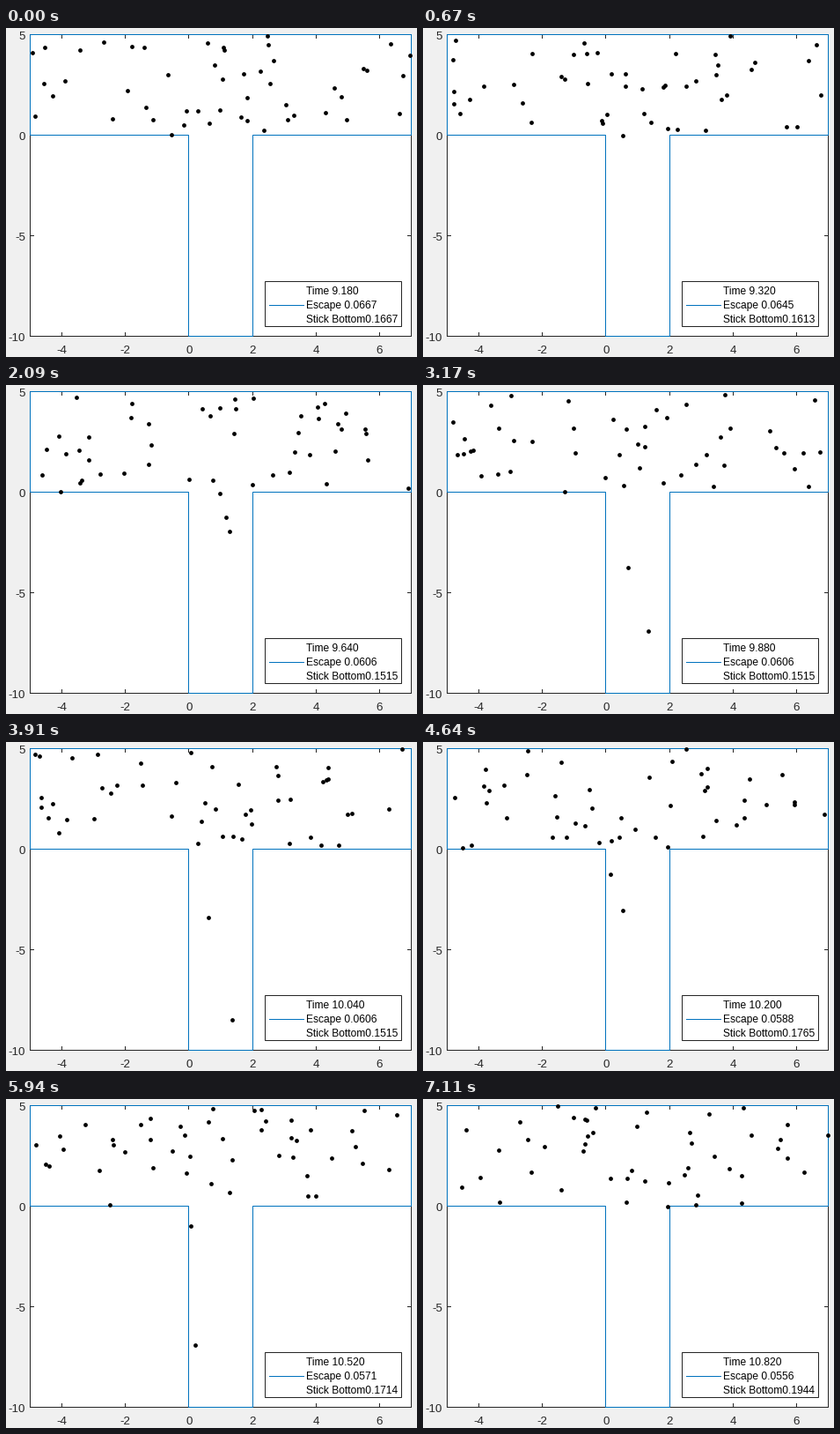
Animation of 467x373 px, one loop 7180 ms. Source, as a matplotlib script:

```python
import numpy as np
import matplotlib.pyplot as plt
from matplotlib.animation import FuncAnimation
from matplotlib.patches import Rectangle

W, H, DPI = 467, 373, 100
PX = 72 / DPI                      # one pixel in points
TICK_MS, LOOP_MS = 20, 7180
STEPS, GAS = 83, 46
INK, BLUE = "#262626", "#0072bd"

# Start of each step: 70 ms apart, with longer holds that thin out later on
n = np.arange(STEPS)
starts = 70 * n + 59.5 * np.round(np.interp(n, [0, 51, 83], [0, 18, 23.2]))

# Particles that visit the well, as key points (step, x, y)
SINKERS = [
    [(0, .64, .6), (14, .43, -.65), (23, 1.18, -1.25), (35, .7, -3.73),
     (51, .53, -3.05), (67, .2, -6.9), (80, .1, -10)],
    [(0, 1.72, 3.07), (14, 2, 1.87), (23, 1.27, -1.93), (35, 1.32, -6.9),
     (48, 1.4, -9.5)],
    [(0, .81, 3.47), (14, .39, 2.67), (23, .98, -.05), (35, .43, 1.86),
     (51, .14, -1.25), (59, .5, .8), (67, .05, -1), (71, .5, .5),
     (76, 1.2, -.6), (82, 1.95, 0)],
]


def fold(p, lo, hi):
    """Reflect free flight between two walls."""
    span = hi - lo
    return hi - np.abs((p - lo) % (2 * span) - span)


def gas_paths():
    """Free flight with rare random scattering in the upper box."""
    rng = np.random.default_rng(7)
    lo, hi = np.array([-5, 0]), np.array([7, 5])
    pos = rng.uniform(lo, hi, (GAS, 2))
    vel = rng.normal(0, 0.2, pos.shape)
    out = []
    for _ in range(STEPS):
        out.append(fold(pos, lo, hi))
        scatter = rng.random((GAS, 1)) < 0.03
        vel = np.where(scatter, rng.normal(0, 0.2, pos.shape), vel)
        pos = pos + vel
    return np.array(out)


def sinker_path(points):
    """Straight runs between key points; gone after the last one."""
    s, x, y = np.transpose(points)
    return np.column_stack([np.interp(n, s, v, right=np.nan) for v in (x, y)])


sunk = np.stack([sinker_path(p) for p in SINKERS], axis=1)
paths = np.concatenate((gas_paths(), sunk), axis=1)

# Every downward crossing of the mouth counts as an entry
inside = sunk[:, :, 1] < 0
entries = np.sum(inside[1:] & ~inside[:-1], axis=1)
entered = 30 + np.concatenate(([0], np.cumsum(entries)))
stuck = 5 + np.isnan(sunk[:, :, 1]).sum(axis=1)


def px(x):
    return 27.5 + (np.asarray(x) + 5) * 433 / 12


def py(y):
    return 7.5 + (5 - np.asarray(y)) * 342 / 15


def crisp(v):
    """Centre of the pixel that holds v."""
    return np.floor(v) + 0.5


fig = plt.figure(figsize=(W / DPI, H / DPI), dpi=DPI, facecolor="#f0f0f0")
ax = fig.add_axes([0, 0, 1, 1])
ax.set(xlim=(0, W), ylim=(H, 0))
ax.axis("off")


def line(x, y, color=INK, z=2):
    ax.plot(crisp(x), crisp(y), color=color, lw=PX, snap=False, zorder=z,
            solid_capstyle="projecting", solid_joinstyle="miter")


def box(x0, y0, x1, y1, z):
    ax.add_patch(Rectangle((x0, y0), x1 - x0, y1 - y0, fc="white", ec=INK,
                           lw=PX, snap=False, zorder=z))


def label(x, y, s, size, ha="left", color="black"):
    return ax.text(x, y, s, fontsize=size * PX, ha=ha, va="baseline",
                   family="Liberation Sans", color=color, zorder=7)


left, right, top, bottom = px(-5), px(7), py(5), py(-10)
box(left, top, right, bottom, 1)
for v in range(-4, 7, 2):
    x = px(v)
    line([x, x], [bottom, bottom - 4])
    line([x, x], [top, top + 4])
    label(x, 369, str(v), 13.33, "center", INK)
for v in (5, 0, -5, -10):
    y = py(v)
    line([left, left + 4], [y, y])
    line([right, right - 4], [y, y])
    label(22, np.floor(y) + 6, str(v), 13.33, "right", INK)

wall_x = [-5, -5, 7, 7, 2, 2, 0, 0, -5]
wall_y = [0, 5, 5, 0, 0, -10, -10, 0, 0]
line(px(wall_x), py(wall_y), BLUE, 3)

box(294.5, 287.5, 449.5, 338.5, 5)
line([299, 338], [314, 314], BLUE, 6)
time_text, escape_text, stick_text = (
    label(341, y, "", 12) for y in (302, 318, 334))

dots, = ax.plot([], [], "o", color="black", ms=4.8 * PX, mew=0, zorder=4)


def update(i):
    k = np.searchsorted(starts, i * TICK_MS + 10, side="right") - 1
    dots.set_data(px(paths[k, :, 0]), py(paths[k, :, 1]))
    time_text.set_text(f"Time {9.18 + 0.02 * k:.3f}")
    escape_text.set_text(f"Escape {2 / entered[k]:.4f}")
    stick_text.set_text(f"Stick Bottom{stuck[k] / entered[k]:.4f}")
    return dots, time_text, escape_text, stick_text


anim = FuncAnimation(fig, update, frames=LOOP_MS // TICK_MS, interval=TICK_MS,
                     init_func=lambda: update(0), repeat=True, repeat_delay=0)
plt.show()
```
